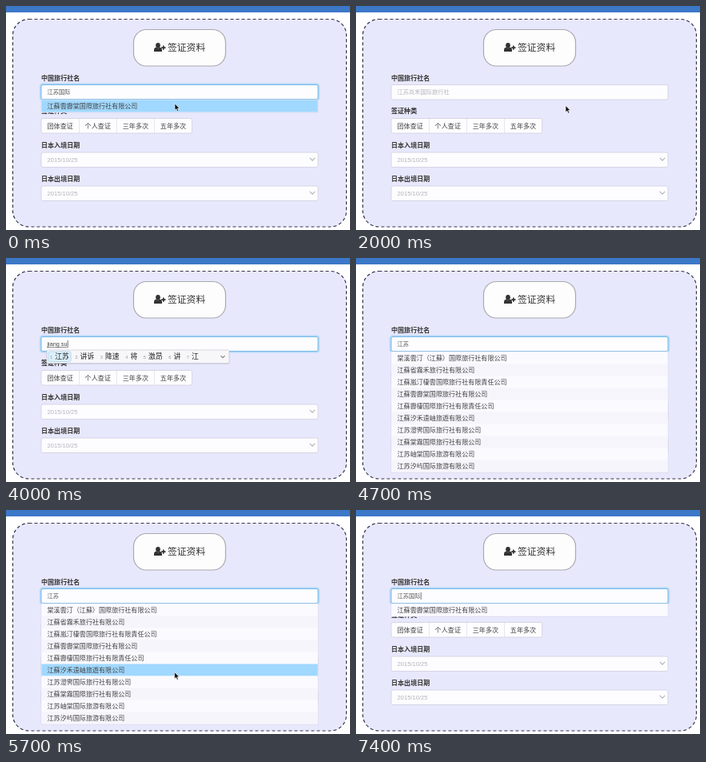
An HTML page for the animation above (7500 ms loop, 430x280 px).

```html
<!DOCTYPE html>
<html lang="zh-CN">
<head>
<meta charset="utf-8">
<style>
html, body { margin: 0; width: 100%; height: 100%; overflow: hidden; background: #fff; }
svg { display: block; width: 430px; height: 280px; }
text { font-family: "Liberation Sans", "Noto Sans CJK SC", "Noto Sans CJK JP", "Noto Sans CJK", sans-serif; white-space: pre; }
</style>
</head>
<body>
<svg id="stage" viewBox="0 0 430 280"></svg>
<script>
const LOOP = 7500, STEP = 100;
const LEFT = 44, WIDTH = 346, TEXT_X = 51.5, ROW = 15, LIST_TOP = 117;
const INPUT_SIZE = 7.25, ROW_SIZE = 8.07;

const agencies = [
  '澄嶼旅行社', '澄嶼霧汀集団国際旅行社有限公司', '厦門岫禾国際旅行社有限公司',
  '汐嵐閣旅遊有限公司', '福建省棠汐国際旅行社股份有限公司', '福州岫国際旅行社',
  '厦門霽帆国際旅行社有限公司', '福建鷺棲旅遊実業総公司', '福建禾霧国際旅行社有限公司',
  '岫嵐国際旅行社総社有限公司'
];
const matches = [
  '棠溪雲汀（江蘇）国際旅行社有限公司', '江蘇省霧禾旅行社有限公司',
  '江蘇嵐汀棲雲国際旅行社有限責任公司', '江蘇雲霽棠国際旅行社有限公司',
  '江蘇霽棲国際旅行社有限責任公司', '江蘇汐禾遠岫旅遊有限公司',
  '江苏澄霁国际旅行社有限公司', '江蘇棠霧国際旅行社有限公司',
  '江苏岫棠国际旅游有限公司', '江苏汐屿国际旅游有限公司'
];
const chosen = matches[3];

const candidates = {
  j: '几 及 即 级 集 记 极 机 鸡',
  ji: '几 及 即 级 集 记 极 机 鸡',
  jia: '家 加 价 假 架 甲 佳 嘉 夹',
  jian: '见 件 间 建 简 减 检 健 剑',
  jiang: '将 讲 江 降 奖 姜 酱 匠 疆',
  'jiang s': '江苏 讲诉 降速 将 讲 江',
  'jiang su': '江苏 讲诉 降速 将 激昂 讲 江',
  g: '过 个 给 更 跟 高 该 刚 歌',
  gu: '古 股 故 骨 鼓 谷 顾 固 孤',
  guo: '过 国 果 锅 裹 郭 帼 涡 聒',
  guoj: '国际 国家 国军 过 国 果 锅',
  guoji: '国际 国籍 过激 过 国 果 锅'
};

// Each state holds from its start time until the next one.
const states = [
  { at: 0, text: '江苏国际', list: [chosen], focus: true, hover: true },
  { at: 400, text: chosen },
  { at: 1600 },
  { at: 2900, focus: true },
  { at: 3300, focus: true, pinyin: 'j', list: agencies },
  { at: 3400, focus: true, pinyin: 'ji', list: agencies },
  { at: 3500, focus: true, pinyin: 'jia' },
  { at: 3600, focus: true, pinyin: 'jian' },
  { at: 3700, focus: true, pinyin: 'jiang' },
  { at: 3900, focus: true, pinyin: 'jiang s' },
  { at: 4000, focus: true, pinyin: 'jiang su' },
  { at: 4300, focus: true, text: '江苏' },
  { at: 4500, focus: true, text: '江苏', list: matches },
  { at: 4900, focus: true, text: '江苏', list: matches, hover: true },
  { at: 6600, focus: true, text: '江苏', pinyin: 'g', list: matches },
  { at: 6800, focus: true, text: '江苏', pinyin: 'gu', list: matches },
  { at: 6900, focus: true, text: '江苏', pinyin: 'guo', list: matches },
  { at: 7000, focus: true, text: '江苏', pinyin: 'guoj', list: matches },
  { at: 7100, focus: true, text: '江苏', pinyin: 'guoji', list: matches },
  { at: 7200, focus: true, text: '江苏国际', list: matches },
  { at: 7300, focus: true, text: '江苏国际', list: [chosen] }
];

// Pointer waypoints: time, x, y
const pointerPath = [
  [0, 211, 122], [600, 211, 122], [1500, 262, 124.5], [2300, 262, 124.5],
  [2800, 250, 108], [4900, 250, 108], [5400, 214, 152], [5800, 210, 212],
  [6200, 212, 150], [6500, 211, 122], [7500, 211, 122]
];

const rect = (x, y, w, h, fill, extra = '') =>
  `<rect x="${x}" y="${y}" width="${w}" height="${h}" fill="${fill}" ${extra}/>`;
const label = (s, x, centre, size, fill = '#444', extra = '') =>
  `<text x="${x}" y="${centre + size * 0.37}" font-size="${size}" fill="${fill}" ${extra}>${s}</text>`;
const chevron = (x, y, r, colour) =>
  `<path d="M${x - r} ${y - r / 2}l${r} ${r} ${r} ${-r}" fill="none" stroke="${colour}" stroke-width="1.1"/>`;
const title = (s, y) => label(s, LEFT, y, 8.05, '#333', 'font-weight="700"');
const field = y => rect(LEFT, y, WIDTH, 18.5, '#fdfdff', 'rx="2" stroke="#cfcfdd" stroke-width=".8"');
const dateField = (name, y) => title(name, y) + field(y + 9) +
  label('2015/10/25', TEXT_X, y + 17.8, 7.6, '#b4b4bc') + chevron(383, y + 17.5, 3.2, '#b0b0b8');

function background() {
  const kinds = ['团体查证', '个人查证', '三年多次', '五年多次'];
  return rect(0, 0, 430, 280, '#fff') + rect(0, 0, 430, 8, '#3c78c8') +
    rect(8.5, 16.5, 417, 259.5, '#e8e8fd', 'rx="20" stroke="#34344c" stroke-width="1.2" stroke-dasharray="4 3"') +
    rect(159.5, 29.5, 115, 45.5, '#fdfdfe', 'rx="16" stroke="#a9a9ad" stroke-width="1.2"') +
    `<g fill="#333"><ellipse cx="190" cy="49.2" rx="2.8" ry="3.2"/>
     <path d="M185 57v-2c0-2 1.3-3.2 3-3.2q2 1.4 4 0c1.700 0 3 1.200 3 3.200v2z"/>
     <path d="M194.200 51.300h1.800v-1.800h1.700v1.800h1.800v1.700h-1.800v1.800H196V53h-1.800z"/></g>` +
    label('签证资料', 202, 52, 11.8, '#333') +
    title('中国旅行社名', 90) + title('签证种类', 131.5) +
    rect(LEFT, 140.5, 188.500, 18.5, '#fdfdff', 'rx="2" stroke="#cfcfdd" stroke-width=".8"') +
    kinds.map((s, i) => (i ? rect(LEFT + 47.1 * i, 141, .7, 18, '#dcdce6') : '') +
      label(s, TEXT_X + 47.1 * i, 150, 8.1)).join('') +
    dateField('日本入境日期', 174) + dateField('日本出境日期', 216);
}

function pointerAt(t) {
  const i = pointerPath.findIndex(p => p[0] > t);
  const [t0, x0, y0] = pointerPath[i - 1], [t1, x1, y1] = pointerPath[i];
  const u = (t - t0) / (t1 - t0), e = u * u * (3 - 2 * u);
  return [x0 + (x1 - x0) * e, y0 + (y1 - y0) * e];
}

const latinWidth = s => [...s].reduce((w, c) =>
  w + ('ij'.includes(c) ? .222 : c === ' ' ? .278 : c === 's' ? .5 : .556), 0) * INPUT_SIZE;

function inputBox({ text = '', pinyin = '', focus }, t) {
  const start = TEXT_X + text.length * INPUT_SIZE;
  const end = start + latinWidth(pinyin);
  let out = focus
    ? rect(LEFT - 1, 97.500, WIDTH + 2, 20, 'none', 'rx="3" stroke="#a9d5f5" stroke-width="2.5" opacity=".7"') +
      rect(LEFT, 98.5, WIDTH, 18, '#fdfdff', 'rx="2" stroke="#70b7e8"')
    : field(98.5);
  if (!text && !focus) out += label('江苏岚禾国际旅行社', TEXT_X, 107.5, INPUT_SIZE, '#b4b4bc');
  out += label(text, TEXT_X, 107.5, INPUT_SIZE, '#555');
  if (pinyin) out += label(pinyin, start, 107.3, INPUT_SIZE, '#444') +
    rect(start, 111.4, end - start, .7, '#555');
  const blink = pinyin || Math.floor(t / 500) % 2 === 0;
  if (focus && t >= 600 && blink) out += rect(end + .3, 103, .8, 9, '#555');
  return out;
}

function dropdown({ list, hover }, y) {
  if (!list) return '';
  const height = list.length * ROW + 1;
  const active = hover ? Math.floor((y + 1 - LIST_TOP) / ROW) : -1;
  return rect(LEFT, LIST_TOP, WIDTH, height, '#f9f8fe', 'stroke="#d5d5e4" stroke-width=".7"') +
    list.map((name, i) => {
      const top = LIST_TOP + i * ROW + .5;
      const fill = i === active ? '#a0d8ff' : i % 2 ? '#f7f5fc' : '#fbfaff';
      return rect(LEFT + .4, top, WIDTH - .8, ROW, fill) + label(name, TEXT_X, top + 7.7, ROW_SIZE);
    }).join('');
}

function imePopup({ text = '', pinyin }) {
  if (!pinyin) return '';
  const left = 51 + text.length * INPUT_SIZE;
  let x = left + 4;
  const items = candidates[pinyin].split(' ').map((word, i) => {
    const w = word.length * 8.8;
    const item = (i ? '' : rect(x - 2, 117, w + 10.5, 12.5, '#dcf0fb', 'rx="1.5" stroke="#a5d0e8" stroke-width=".7"')) +
      label(i + 1, x, 123.500, 5.6, '#999') + label(word, x + 6.2, 123, 8.8, '#222');
    x += w + 13.8;
    return item;
  }).join('');
  return rect(left - .5, 116, 229, 17, '#77778a', 'rx="2" opacity=".2"') +
    rect(left, 115, 228, 16.5, '#f7f7fa', 'rx="1.5" stroke="#c8c8d2" stroke-width=".7"') +
    items + chevron(left + 220, 123.5, 2.5, '#888');
}

function pointer(t, x, y) {
  const typing = (t >= 3200 && t < 4900) || t >= 6600;
  return typing ? '' : `<path transform="translate(${x} ${y})" d="M0 0v8.300l1.900-1.700 1.300 3 1.500-.7-1.300-2.900h2.500z"
    fill="#111" stroke="#fff" stroke-width=".6"/>`;
}

const stage = document.getElementById('stage');
stage.innerHTML = background() + '<g id="live"></g>';
const live = document.getElementById('live');
const origin = performance.now();
let drawn = -1;

function render(t) {
  const state = states.filter(s => s.at <= t).pop();
  const [x, y] = pointerAt(t);
  live.innerHTML = inputBox(state, t) + dropdown(state, y) + imePopup(state) + pointer(t, x, y);
}

function tick() {
  const elapsed = Math.max(0, performance.now() - origin) % LOOP;
  const t = Math.floor(elapsed / STEP) * STEP;
  if (t !== drawn) render(drawn = t);
  requestAnimationFrame(tick);
}
tick();
</script>
</body>
</html>
```
